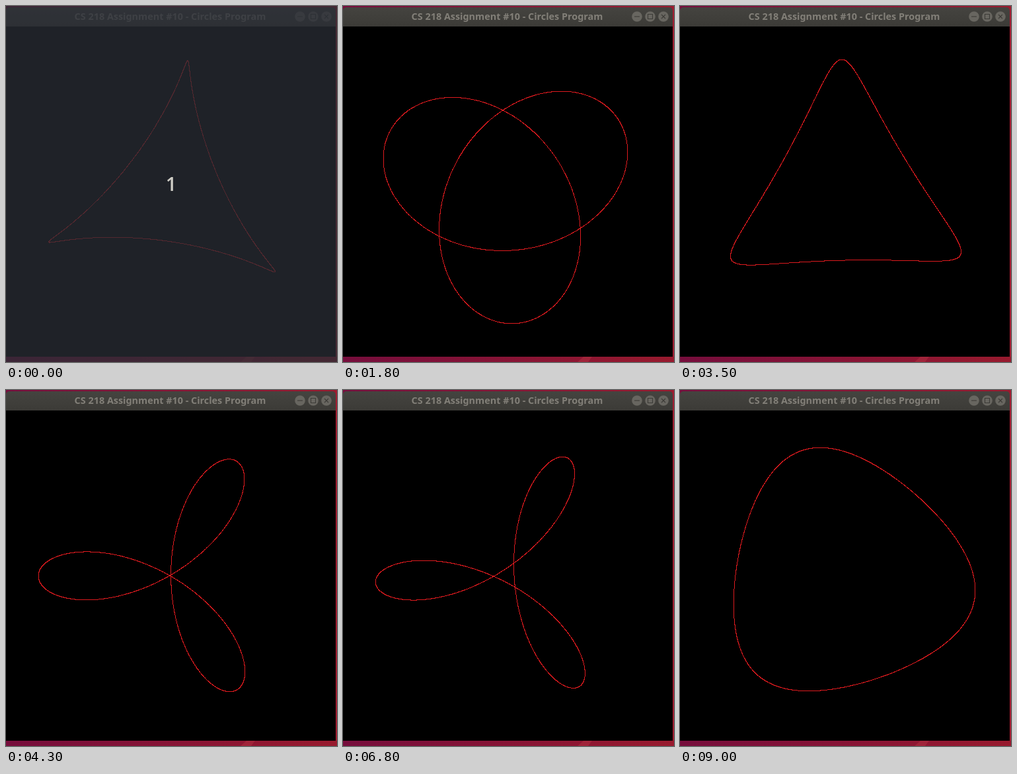
An HTML page with a canvas that plays this animation: 501x539 px, repeating every 9.1 s.

```html
<!DOCTYPE html>
<html lang="en">
<head>
<meta charset="utf-8">
<title>Circles Program</title>
<style>
  html, body { margin: 0; width: 100%; height: 100%; overflow: hidden; background: #000; }
  canvas { display: block; }
</style>
</head>
<body>
<canvas id="stage" width="501" height="539"></canvas>
<script>
const ctx = document.getElementById('stage').getContext('2d');
const LOOP = 9100, TICK = 100, FADE_TICKS = 4, TAU = 2 * Math.PI;
const CENTER = { x: 249, y: 281 }, RADIUS = 200;

// [tick, phase] where the pace of the program changes; linear in between.
const PACE = [
  [0, .3125], [18, .723], [27, 1.034], [32, 1.12], [39, 1.4], [47, 1.597],
  [54, 1.963], [57, 2.046], [68, 2.475], [78, 2.76], [90, 3.092]
];

function phaseAt(tick) {
  const i = Math.max(1, PACE.findIndex(([t]) => t >= tick));
  const [t0, p0] = PACE[i - 1], [t1, p1] = PACE[i];
  return p0 + (p1 - p0) * (tick - t0) / (t1 - t0);
}

function fillRect(color, x, y, w, h) {
  ctx.fillStyle = color;
  ctx.fillRect(x, y, w, h);
}

function label(text, x, y, font, color) {
  ctx.font = font;
  ctx.fillStyle = color;
  ctx.textAlign = 'center';
  ctx.fillText(text, x, y);
}

function gradient(x, y, from, to) {
  const g = ctx.createLinearGradient(0, 0, x, y);
  g.addColorStop(0, from);
  g.addColorStop(1, to);
  return g;
}

function button(x, drawGlyph) {
  ctx.beginPath();
  ctx.arc(x, 16, 7.8, 0, TAU);
  ctx.fillStyle = '#686660';
  ctx.fill();
  ctx.strokeStyle = '#3c3b37';
  ctx.lineWidth = 1.1;
  ctx.beginPath();
  drawGlyph(x, 16);
  ctx.stroke();
}

function drawWindow() {
  fillRect(gradient(501, 0, '#760d3c', '#981a2e'), 0, 0, 501, 539);
  ctx.beginPath();
  ctx.moveTo(364, 531);
  ctx.lineTo(377, 531);
  ctx.lineTo(371, 539);
  ctx.lineTo(355, 539);
  ctx.fillStyle = '#a0243a';
  ctx.fill();
  fillRect('#a01c30', 499, 0, 2, 531);

  ctx.beginPath();
  ctx.roundRect(0, 2, 499, 40, [5, 5, 0, 0]);
  ctx.fillStyle = gradient(0, 31, '#454440', '#3c3b37');
  ctx.fill();
  fillRect('#000', 0, 31, 499, 500);

  label('CS 218 Assignment #10 - Circles Program', 248.5, 21,
    'bold 14.4px "Noto Sans", sans-serif', '#827f78');
  button(445, (x, y) => { ctx.moveTo(x - 4, y); ctx.lineTo(x + 4, y); });
  button(465, (x, y) => ctx.rect(x - 3.5, y - 3.5, 7, 7));
  button(485, (x, y) => {
    ctx.moveTo(x - 3, y - 3); ctx.lineTo(x + 3, y + 3);
    ctx.moveTo(x + 3, y - 3); ctx.lineTo(x - 3, y + 3);
  });
}

// Two counter-rotating circles whose radii always add up to RADIUS,
// plotted as single pixels.
function drawCurve(phase) {
  const s = phase % 1, steps = 3000;
  for (let i = 0; i < steps; i++) {
    const a = i / steps * TAU, b = 2 * a + TAU * s;
    const x = CENTER.x + RADIUS * ((1 - s) * Math.cos(a) + s * Math.cos(b));
    const y = CENTER.y - RADIUS * ((1 - s) * Math.sin(a) - s * Math.sin(b));
    fillRect('#dc1a1e', Math.floor(x), Math.floor(y), 1, 1);
  }
}

function drawCountdown(opacity) {
  ctx.globalAlpha = opacity;
  fillRect('rgba(42, 45, 53, .76)', 0, 0, 501, 539);
  label('1', 250, 280, '600 29px "Open Sans", sans-serif', '#cfcdc6');
  ctx.globalAlpha = 1;
}

function frame() {
  const tick = Math.floor(performance.now() % LOOP / TICK);
  drawWindow();
  drawCurve(phaseAt(tick));
  if (tick < FADE_TICKS) drawCountdown(1 - tick / FADE_TICKS);
  requestAnimationFrame(frame);
}
frame();
</script>
</body>
</html>
```
